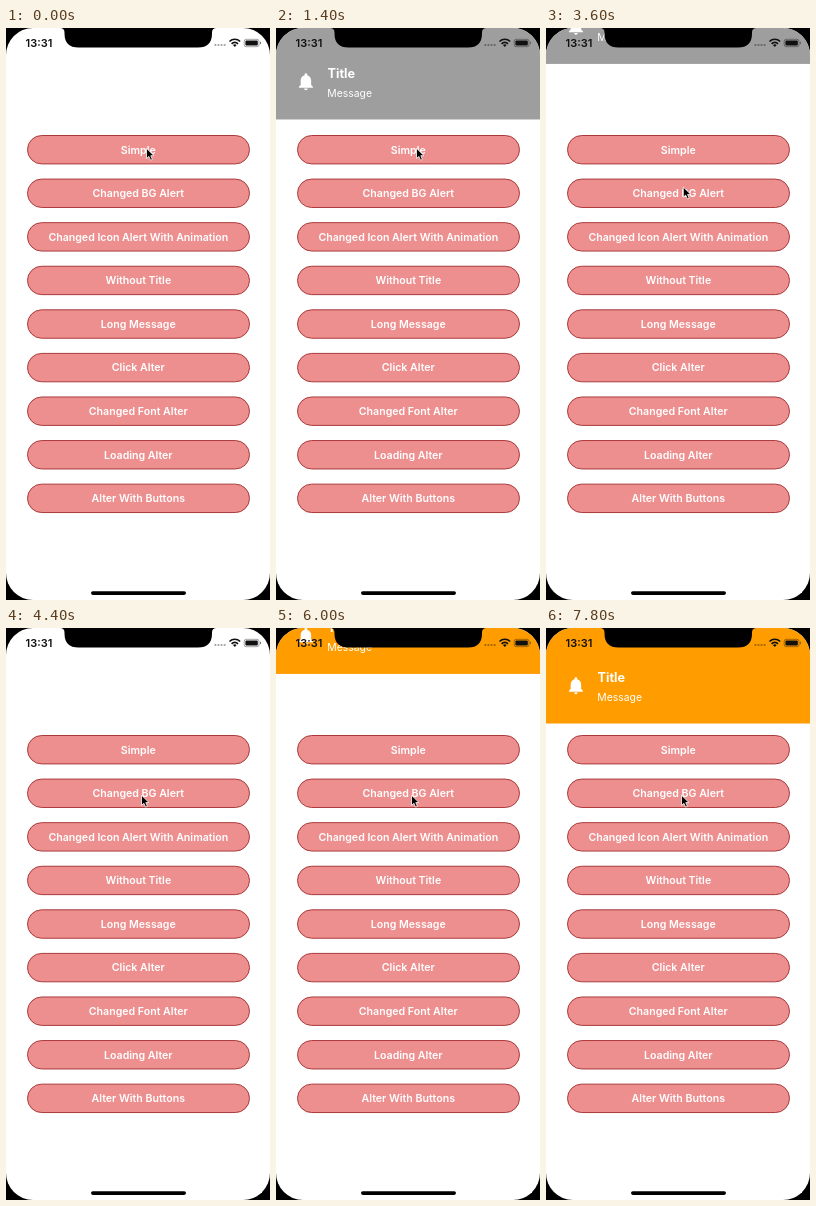
An HTML page for the animation above (8000 ms loop, 264x572 px).

```html
<!DOCTYPE html>
<html lang="en">
<head>
<meta charset="utf-8">
<title>Alert banners</title>
<style>
  html, body { margin: 0; width: 100%; height: 100%; overflow: hidden; background: #000; }
  svg { display: block; width: 264px; height: 572px; font-family: Inter, "Liberation Sans", sans-serif; }
  .button rect { stroke: #a93a3c; stroke-width: 1; }
  .button text { font-size: 10.6px; font-weight: 600; text-anchor: middle; }
</style>
</head>
<body>
<svg viewBox="0 0 264 572">
  <defs>
    <clipPath id="screen"><rect width="264" height="572" rx="27"/></clipPath>
  </defs>
  <rect width="264" height="572" fill="#000"/>
  <g clip-path="url(#screen)">
    <rect width="264" height="572" fill="#fff"/>
    <g id="buttons"></g>
    <g id="banner" fill="#fff">
      <rect id="panel" y="-60" width="264" height="155.5"/>
      <path transform="translate(19.4 47.1) scale(.875)" d="M12 22c1.1 0 2-.9 2-2h-4c0 1.1.9 2 2 2zm6-6v-5c0-3.1-1.6-5.6-4.5-6.3V4a1.5 1.5 0 0 0-3 0v.7C7.6 5.4 6 7.9 6 11v5l-2 2v1h16v-1z"/>
      <text x="51.5" y="53.6" font-size="12.7" font-weight="700">Title</text>
      <text x="51.3" y="72.7" font-size="10.4">Message</text>
    </g>
    <path d="M54 0Q58.500 0 58.500 4.500V5.500Q58.500 19.500 72.500 19.500H192Q206 19.500 206 5.500V4.500Q206 0 210.500 0Z"/>
    <text x="19.500" y="18.700" font-size="11" font-weight="600" fill="#111">13:31</text>
    <path d="M208.500 17h11" stroke="#000" stroke-opacity=".35" stroke-width="1.800" stroke-dasharray="1.800 1.270"/>
    <g fill="none" stroke="#111" stroke-width="1.700">
      <path d="M223.500 13.500a7.400 7.400 0 0 1 10.600 0M225.600 15.800a4.400 4.400 0 0 1 6.400 0"/>
    </g>
    <path d="M226.900 17.100a2.700 2.700 0 0 1 3.800 0l-1.900 2z" fill="#111"/>
    <rect x="238.200" y="11.300" width="14.800" height="7.400" rx="2" fill="none" stroke="#000" stroke-opacity=".45" stroke-width=".8"/>
    <rect x="239.400" y="12.500" width="12.400" height="5" rx="1" fill="#111"/>
    <path d="M254 13.600a1.500 1.500 0 0 1 0 2.800z" fill="#555"/>
    <rect x="85" y="563.300" width="95" height="3.600" rx="1.800"/>
  </g>
  <path id="cursor" d="M0 0V10.200L2.400 8.100L4 11.900L5.900 11.100L4.300 7.400H7.500Z" stroke="#fff" stroke-width=".8"/>
</svg>
<script>
const LOOP = 8000, TICK = 200, HEIGHT = 95.5;
const labels = ["Simple", "Changed BG Alert", "Changed Icon Alert With Animation",
  "Without Title", "Long Message", "Click Alter", "Changed Font Alter",
  "Loading Alter", "Alter With Buttons"];

const find = id => document.getElementById(id);
const banner = find("banner"), panel = find("panel"), cursor = find("cursor");

function add(parent, tag, attrs) {
  const node = document.createElementNS("http://www.w3.org/2000/svg", tag);
  for (const key in attrs) node.setAttribute(key, attrs[key]);
  return parent.appendChild(node);
}

const buttons = labels.map((label, i) => {
  const y = 107.5 + i * 43.58;
  const group = add(find("buttons"), "g", { class: "button" });
  const rect = add(group, "rect", { x: 21.5, y, width: 222, height: 28.4, rx: 14.2 });
  const text = add(group, "text", { x: 132.3, y: y + 18 });
  text.textContent = label;
  return { rect, text };
});

const clamp = v => Math.min(1, Math.max(0, v));
const smooth = v => v * v * (3 - 2 * v);
const progress = (t, from, to) => smooth(clamp((t - from) / (to - from)));
const mix = (a, b, p) => a + (b - a) * p;
const blend = (a, b, p) => `rgb(${a.map((v, i) => Math.round(mix(v, b[i], p)))})`;

// Underdamped spring: 1 at rest position before release, settling on 0
function spring(ms) {
  if (ms <= 0) return 1;
  if (ms >= 2000) return 0;
  const s = ms / 1000, decay = 3.45, w = 11;
  return Math.exp(-decay * s) * (Math.cos(w * s) + decay / w * Math.sin(w * s));
}

function bannerY(t) {
  if (t >= 5000) return -HEIGHT * spring(t - 5900);
  return -HEIGHT * Math.max(spring(t - 925), progress(t, 3250, 3850));
}

const cursorPath = [
  [0, 140.5, 120.3], [2150, 140.5, 120.3], [2900, 137.3, 159],
  [3700, 137.3, 159], [4400, 135.5, 167.2], [LOOP, 135.5, 167.2]
];

function cursorAt(t) {
  const i = cursorPath.findIndex(p => p[0] > t);
  const [t0, x0, y0] = cursorPath[i - 1], [t1, x1, y1] = cursorPath[i];
  const p = progress(t, t0, t1);
  return [mix(x0, x1, p), mix(y0, y1, p)];
}

const press = (t, from, to) => progress(t, from, from + 200) * (1 - progress(t, to, to + 150));

function paintButton({ rect, text }, amount) {
  rect.setAttribute("fill", blend([238, 143, 143], [222, 45, 45], amount));
  text.setAttribute("fill", blend([255, 255, 255], [247, 205, 205], amount));
}

function render(t) {
  paintButton(buttons[0], press(t, 100, 450));
  paintButton(buttons[1], press(t, 4900, 5430));
  panel.setAttribute("fill", t < 5000 ? "#9e9e9e" : "#ff9c00");
  banner.setAttribute("transform", `translate(0 ${bannerY(t).toFixed(2)})`);
  banner.setAttribute("visibility", bannerY(t) <= -HEIGHT ? "hidden" : "visible");
  cursor.setAttribute("transform", `translate(${cursorAt(t)})`);
}

buttons.forEach(b => paintButton(b, 0));
const start = performance.now();
function loop() {
  const t = (performance.now() - start) % LOOP;
  render(Math.floor(t / TICK) * TICK);
  requestAnimationFrame(loop);
}
loop();
</script>
</body>
</html>
```
